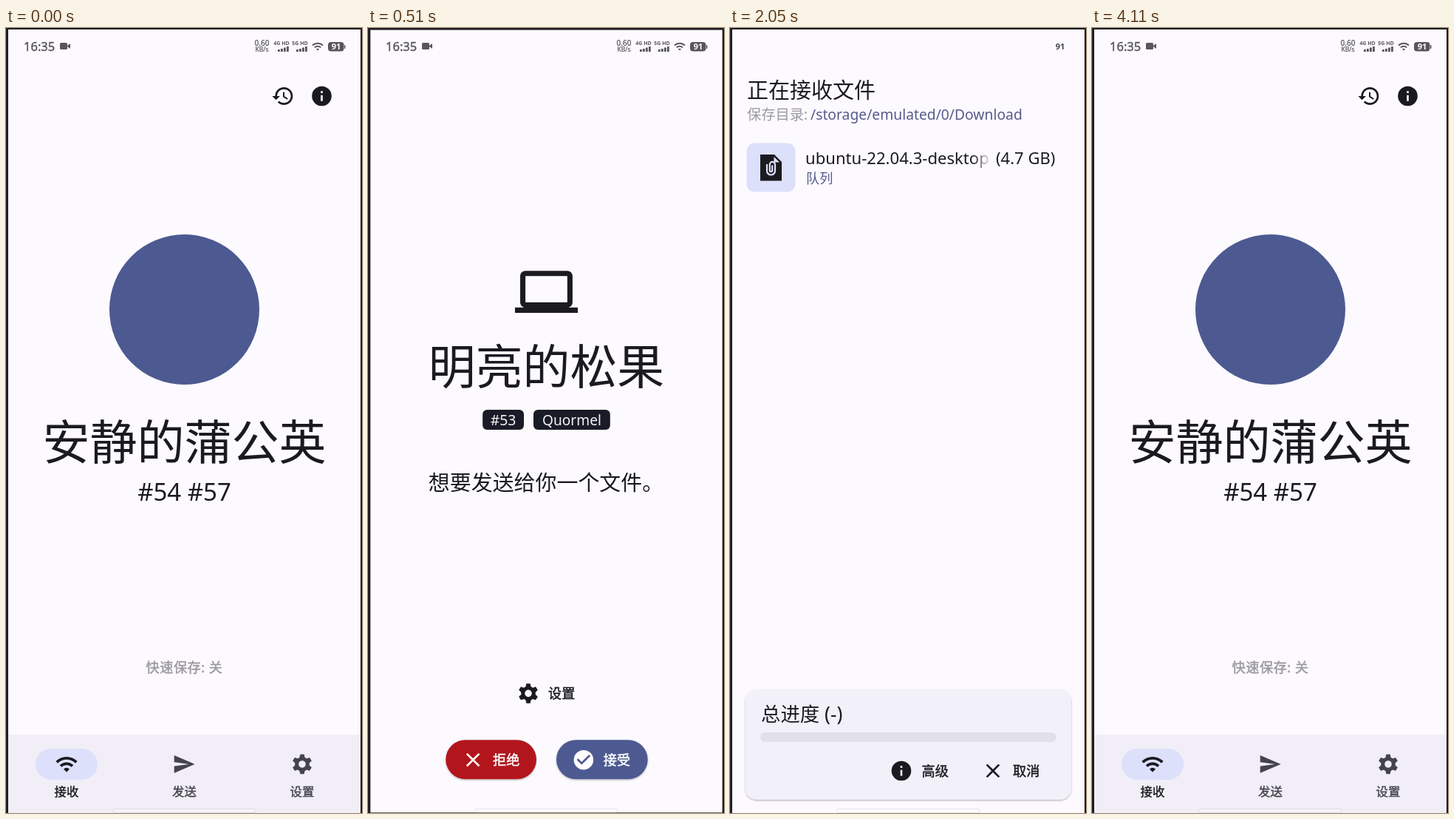
Recreate the animation shown at these times as an HTML page. Size 482 by 1061 pixels, loop 4.16 s.

```html
<!DOCTYPE html>
<html lang="zh-CN">
<head>
<meta charset="utf-8">
<style>
  html, body { margin: 0; width: 100%; height: 100%; overflow: hidden; background: #1f1e22; }
  svg { display: block; width: 100vw; height: 100vh; }
  text { font-family: "Noto Sans", "Noto Sans CJK SC", "Noto Sans CJK", sans-serif; white-space: pre; }
</style>
</head>
<body>
<svg id="stage" viewBox="0 0 482 1061">
  <defs>
    <linearGradient id="nameFade" gradientUnits="userSpaceOnUse" x1="328" y1="0" x2="354" y2="0">
      <stop offset="0" stop-color="#1b1a20"/>
      <stop offset="1" stop-color="#1b1a20" stop-opacity="0"/>
    </linearGradient>
    <filter id="soft" x="-10%" y="-20%" width="120%" height="150%">
      <feDropShadow dx="0" dy="1.2" stdDeviation="1.2" flood-color="#000" flood-opacity=".3"/>
    </filter>
    <clipPath id="acceptClip"><rect x="255" y="963" width="124" height="53" rx="26.5"/></clipPath>
  </defs>
</svg>
<script>
const LOOP = 4160;
const PAGE = '#fcfaff', INK = '#1b1a20', BLUE = '#4d5a91', TINT = '#dde0fa', STATUS = '#58565c', GREY = '#9c9aa1', NAV = '#45444c';
const MIDDLE = ' text-anchor="middle" ', BOLD = ' font-weight="700" ';
const stage = document.getElementById('stage');

const ICONS = {
  computer: 'M20 18c1.1 0 2-.9 2-2V6c0-1.1-.9-2-2-2H4c-1.1 0-2 .9-2 2v10c0 1.1.9 2 2 2H0v2h24v-2zM4 6h16v10H4z',
  history: 'M13 3c-4.97 0-9 4.03-9 9H1l3.89 3.89.07.14L9 12H6c0-3.87 3.13-7 7-7s7 3.13 7 7-3.13 7-7 7c-1.93 0-3.68-.79-4.94-2.06l-1.42 1.42C8.27 19.99 10.51 21 13 21c4.97 0 9-4.03 9-9s-4.03-9-9-9zm-1 5v5l4.28 2.54.72-1.21-3.5-2.08V8z',
  info: 'M12 2a10 10 0 1 0 0 20 10 10 0 0 0 0-20zm1 15h-2v-6h2zm0-8h-2V7h2z',
  check: 'M12 2a10 10 0 1 0 0 20 10 10 0 0 0 0-20zm-2 15l-5-5 1.41-1.41L10 14.17l7.59-7.59L19 8z',
  wifi: 'M1 9l2 2c4.97-4.97 13.03-4.97 18 0l2-2C16.93 2.93 7.08 2.93 1 9zm8 8l3 3 3-3c-1.65-1.66-4.34-1.66-6 0zm-4-4l2 2c2.76-2.76 7.24-2.76 10 0l2-2C15.14 9.14 8.87 9.14 5 13z',
  send: 'M2 21l21-9L2 3v7l15 2-15 2z',
  close: 'M19 6.41L17.59 5 12 10.59 6.41 5 5 6.41 10.59 12 5 17.59 6.41 19 12 13.41 17.59 19 19 17.59 13.41 12z'
};

const rect = (x, y, w, h, fill, r = 0, extra = '') =>
  `<rect x="${x}" y="${y}" width="${w}" height="${h}" rx="${r}" fill="${fill}" ${extra}/>`;

// Text is placed by the vertical centre of its glyphs.
const text = (x, y, size, str, fill = INK, extra = '') =>
  `<text x="${x}" y="${y + size * 0.37}" font-size="${size}" fill="${fill}" ${extra}>${str}</text>`;

// A thin outline gives the medium weight.
const label = (x, y, size, str, fill = INK, extra = '') =>
  text(x, y, size, str, fill, `stroke="${fill}" stroke-width="${size * 0.025}" ${extra}`);

const icon = (name, x, y, fill = INK, scale = 1.33) =>
  `<path transform="translate(${x} ${y}) scale(${scale}) translate(-12 -12)" fill="${fill}" d="${ICONS[name]}"/>`;

const gear = (x, y, fill = INK) => {
  let teeth = '';
  for (let a = 0; a < 360; a += 60) teeth += `<path d="M-1.8-9.7H1.8L2.5-6H-2.5Z" stroke-width=".6" stroke-linejoin="round" transform="rotate(${a})"/>`;
  return `<g transform="translate(${x} ${y}) scale(1.33)" fill="${fill}" stroke="${fill}">${teeth}
    <circle r="5.5" fill="none" stroke-width="3.8"/></g>`;
};

const backdrop = () => rect(3, 2, 477, 1059, PAGE);

const home = () => backdrop() +
  icon('history', 375, 92) + icon('info', 427.5, 92) +
  `<circle cx="241.5" cy="380.5" r="101.5" fill="${BLUE}"/>` +
  text(241.5, 559, 64, '安静的蒲公英', INK, MIDDLE) +
  text(241.5, 627, 33, '#54 #57', INK, MIDDLE) +
  label(241.5, 864, 18.3, '快速保存: 关', GREY, MIDDLE + 'letter-spacing=".4"') +
  rect(3, 955, 477, 106, '#f1eef7') +
  rect(40, 974, 84, 42, TINT, 21) +
  icon('wifi', 82, 995) + icon('send', 241, 995, NAV) + gear(401, 995, NAV) +
  label(82, 1032, 16.4, '接收', INK, MIDDLE) +
  label(241.5, 1032, 16.4, '发送', NAV, MIDDLE) +
  label(401, 1032, 16.4, '设置', NAV, MIDDLE);

const request = () => backdrop() +
  icon('computer', 241.5, 356.3, INK, 3.55) +
  text(241.5, 457, 64, '明亮的松果', INK, MIDDLE) +
  rect(155, 516, 56, 27, '#191b26', 6) + text(183, 530, 19.5, '#53', '#f3f1f8', MIDDLE) +
  rect(224, 516, 104, 27, '#191b26', 6) + text(276, 530, 19.2, 'Quormel', '#f3f1f8', MIDDLE) +
  text(241, 614, 29, '想要发送给你一个文件。', INK, MIDDLE) +
  gear(217, 900) + label(244, 900, 18.2, '设置') +
  rect(105, 963, 123, 53, '#b2191f', 26.5, 'filter="url(#soft)"') +
  icon('close', 142, 990, '#fff') + label(169, 990, 18.2, '拒绝', '#fff') +
  rect(255, 963, 124, 53, BLUE, 26.5, 'filter="url(#soft)"') +
  `<g clip-path="url(#acceptClip)"><circle id="ripple" cx="315" cy="990" r="0" fill="#fff" opacity=".12"/></g>` +
  icon('check', 292, 990, '#fff') + label(319, 990, 18.2, '接受', '#fff');

const progress = () => backdrop() +
  text(23, 84, 29, '正在接收文件') +
  text(23, 117, 19.3, '保存目录:', GREY) +
  text(109, 117, 19.3, '/storage/emulated/0/Download', '#565b8d') +
  rect(22.5, 155.5, 66, 66, TINT, 11) +
  `<path d="M41 171H60L70 181V206.500H41Z" fill="${INK}"/><path d="M59.500 174V181.500H67Z" fill="${TINT}"/>
   <path d="M50 184v9a5.500 5.500 0 0 0 11 0v-8.500a3.600 3.600 0 0 0-7.200 0v8a1.700 1.700 0 0 0 3.400 0v-7" fill="none" stroke="${TINT}" stroke-width="2.200"/>` +
  `<g id="fileName">${text(102, 176, 22.1, 'ubuntu-22.04.3-desktop', 'url(#nameFade)')}${text(360, 176, 22, '(4.7 GB)')}</g>` +
  `<g id="queued">${text(103, 203, 18.2, '队列', '#565b8d')}</g>` +
  `<g id="fileBar">${rect(102, 199, 339, 13, '#e1dfea', 6.5)}</g>` +
  rect(21, 894, 441, 149, '#f2f0f9', 15, 'filter="url(#soft)"') +
  text(42, 927, 26.4, '总进度 <tspan id="remaining"></tspan>') +
  rect(41, 952, 401, 13, '#e1dfea', 6.5) +
  `<path id="sliver" d="M42.500 955q-1.500 3 0 7" fill="none" stroke="${BLUE}"/>` +
  icon('info', 232, 1004) + label(259.5, 1004, 18.2, '高级') +
  icon('close', 356, 1004) + label(383, 1004, 18.2, '取消');

const signal = x => [3, 4, 5.5, 7].map((h, i) => rect(x + i * 4, 32 - h, 2.8, h, STATUS)).join('');

const statusBar = () =>
  label(24, 25, 16.5, '16:35', STATUS) +
  rect(73, 20, 10, 9, STATUS, 1.5) + `<path d="M83 24l4-3v7l-4-3z" fill="${STATUS}"/>` +
  label(346.5, 20.5, 10, '<tspan id="speed"></tspan>', STATUS, MIDDLE) +
  label(346.5, 29, 8.5, 'KB/s', STATUS, MIDDLE) +
  text(373, 20, 7, '4G HD', STATUS, MIDDLE + BOLD) + signal(368) +
  text(398, 20, 7, '5G HD', STATUS, MIDDLE + BOLD) + signal(393) +
  icon('wifi', 422, 25, STATUS, 0.7) +
  rect(436, 19, 21.5, 12.5, STATUS, 4) + rect(458, 23, 1.5, 5, STATUS, 0.7);

const layer = (id, content) => `<g id="${id}">${content}</g>`;
stage.innerHTML += layer('home', home()) +
  rect(3, 2, 477, 1059, '#000', 0, 'id="scrim"') +
  layer('request', request()) + layer('progress', progress()) + layer('status', statusBar()) +
  text(447, 25.2, 11, '91', '#fff', 'id="charge"' + BOLD + MIDDLE) +
  rect(145, 1055.5, 193, 5, '#fff', 2, 'fill-opacity=".3" stroke="#5a5a78" stroke-opacity=".13"');

const part = Object.fromEntries([...stage.querySelectorAll('[id]')].map(el => [el.id, el]));
const ramp = (t, from, to) => Math.min(1, Math.max(0, (t - from) / (to - from)));
const fade = (name, value) => {
  part[name].style.opacity = value;
  part[name].style.display = value > 0 ? '' : 'none';
};

function draw(t) {
  // The request page zooms in over a darkening home page.
  const zoom = t < 187 ? 0.85 : 1 - 0.15 * Math.exp((187 - t) / 73);
  part.request.setAttribute('transform', `translate(241.5 531.5) scale(${zoom}) translate(-241.5 -531.5)`);
  fade('request', t < 1700 ? ramp(t, 187, 240) : 0);
  fade('scrim', t < 1700 ? 0.6 * ramp(t, 233, 352) : 0);
  part.ripple.setAttribute('r', 70 * ramp(t, 960, 1140));

  // The progress page cross-fades in and out.
  fade('progress', ramp(t, 1110, 1640) * (1 - ramp(t, 3620, 4090)));
  const receiving = t >= 2330;
  fade('queued', receiving ? 0 : 1);
  fade('fileBar', receiving ? 1 : 0);
  fade('sliver', t >= 3030 ? 0.6 : 0);
  part.fileName.setAttribute('transform', `translate(0 ${receiving ? -1 : 0})`);
  part.remaining.textContent = t < 2560 ? '(-)' : '(12:23)';

  // The status icons turn white for a moment, leaving only the dark charge number.
  const hidden = ramp(t, 1680, 1780) * (1 - ramp(t, 2230, 2350));
  fade('status', 1 - hidden);
  part.charge.setAttribute('fill', hidden > 0.5 ? NAV : '#fff');
  part.speed.textContent = t >= 2000 && t < 3850 ? '0.90' : '0.60';
}

const start = performance.now();
function tick() {
  draw((performance.now() - start) % LOOP);
  requestAnimationFrame(tick);
}
tick();
</script>
</body>
</html>
```
